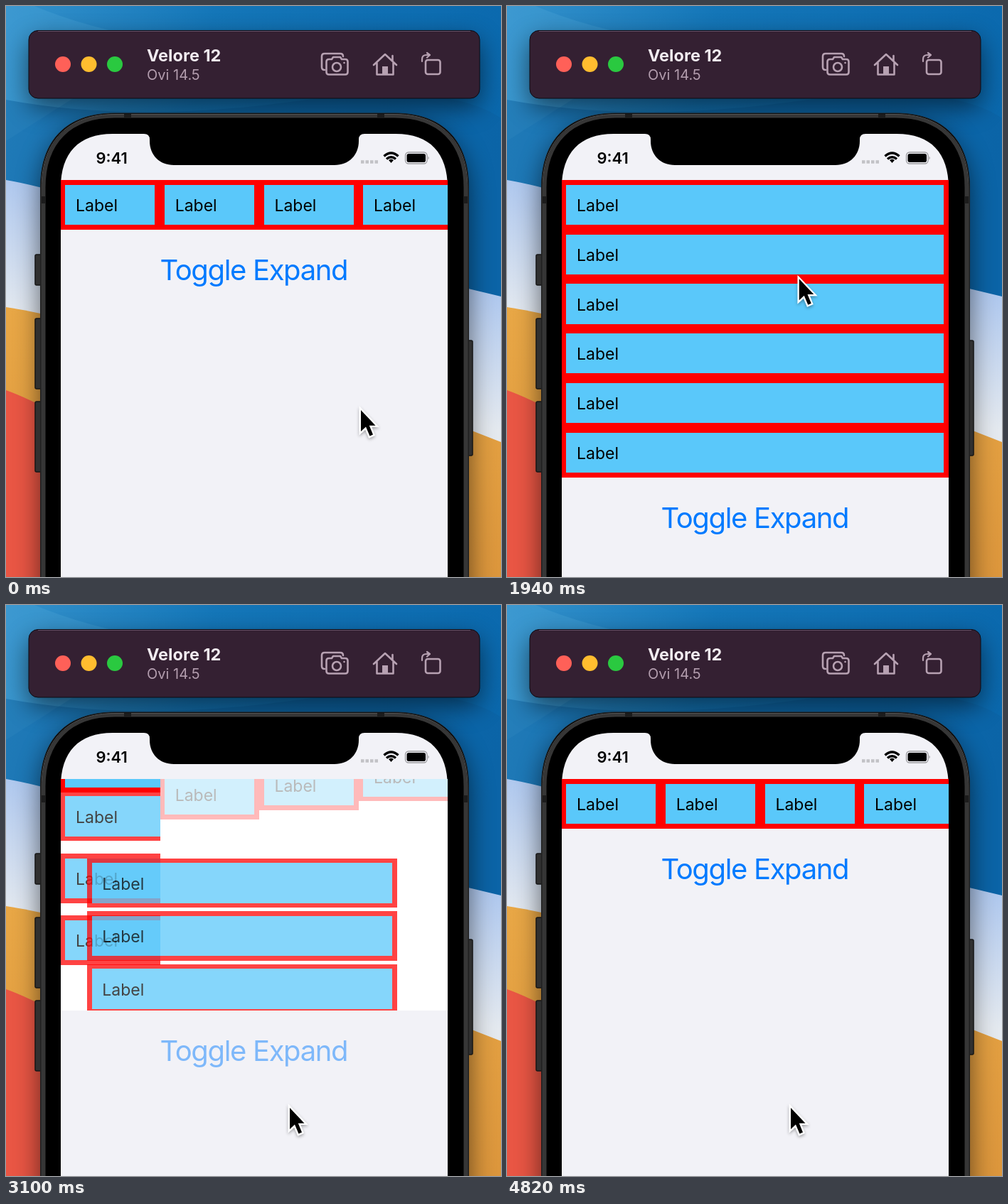
These frames come from a looping animation (696 px wide and 804 px high, 4.95 s). An HTML page:

```html
<!DOCTYPE html>
<html lang="en">
<head>
<meta charset="utf-8">
<title>Toggle Expand</title>
<style>
html, body { margin: 0; height: 100%; overflow: hidden; }
#stage { display: block; width: 100vw; height: 100vh; font-family: Inter, Roboto, sans-serif; }
#list rect { shape-rendering: crispEdges; }
.icon { fill: none; stroke: #b7a1b2; stroke-width: 2.6; stroke-linecap: round; stroke-linejoin: round; }
.key { fill: #303030; stroke: #161616; stroke-width: 1.5; }
</style>
</head>
<body>
<svg id="stage" viewBox="0 0 696 804">
  <defs>
    <linearGradient id="sky" x2="1" y2=".25">
      <stop offset="0" stop-color="#3492cc"/><stop offset=".4" stop-color="#1476b8"/><stop offset="1" stop-color="#0a68ad"/>
    </linearGradient>
    <linearGradient id="mist" gradientUnits="userSpaceOnUse" x1="0" y1="245" x2="-42" y2="425">
      <stop offset="0" stop-color="#afc8ee"/><stop offset="1" stop-color="#e4e9ef"/>
    </linearGradient>
    <linearGradient id="sand" x2="0" y2="1">
      <stop offset="0" stop-color="#e8a746"/><stop offset="1" stop-color="#dc963c"/>
    </linearGradient>
    <filter id="blur" x="-20%" y="-40%" width="140%" height="180%"><feGaussianBlur stdDeviation="18"/></filter>
    <filter id="soft" x="-50%" y="-50%" width="200%" height="200%">
      <feDropShadow dx="0" dy="2" stdDeviation="2" flood-opacity=".35"/>
    </filter>
    <path id="body" d="M48.500 850V256C48.500 188 86 151 153 151H546C613 151 650.500 188 650.500 256V850Z"/>
    <path id="screen" d="M77 804V256C77 207 102 180 150 180H194q8 0 8 8v2c0 20 14 34 34 34H462c20 0 34-14 34-34v-2q0-8 8-8H548C596 180 621 207 621 256V804Z"/>
  </defs>

  <rect width="696" height="804" fill="url(#sky)"/>
  <path d="M0 0H40Q110 30 220 50L0 190Z" fill="#5fb3de" opacity=".2"/>
  <path d="M0 132Q180 165 400 135T696 158V420H0Z" fill="#0c609f" opacity=".45"/>
  <path d="M0 245Q60 255 200 300T650 398L696 409V804H0Z" fill="url(#mist)"/>
  <path d="M0 424Q60 433 200 470T650 596L696 614V804H0Z" fill="url(#sand)"/>
  <path d="M0 541Q60 562 200 650T360 804H0Z" fill="#e95644"/>

  <use href="#body" y="14" opacity=".58" filter="url(#blur)"/>
  <rect x="32" y="48" width="634" height="95" rx="14" opacity=".55" filter="url(#blur)"/>

  <g class="key">
    <rect x="41" y="350" width="14" height="43" rx="2"/>
    <rect x="41" y="440" width="14" height="99" rx="2"/>
    <rect x="41" y="557" width="14" height="99" rx="2"/>
    <rect x="642" y="471" width="14" height="162" rx="2"/>
  </g>
  <use href="#body" stroke="#202020"/>
  <path d="M53 804V256C53 191 90 155 153 155H546C609 155 646 191 646 256V804" fill="none" stroke="#363636" stroke-width="5"/>
  <path d="M50 804V256C50 189 88 152.500 153 152.500H546C611 152.500 649 189 649 256V804" fill="none" stroke="#555"/>
  <path d="M166 155h10M522 155h10M53 268v10M646 268v10" stroke="#1c1c1c" stroke-width="6"/>
  <use href="#screen" fill="#f2f2f7"/>

  <text x="126.500" y="222" font-size="22" font-weight="600">9:41</text>
  <path d="M499 219.500h4.500m2 0h4.500m2 0h4.500m2 0h4.500" stroke="#c2c2c6" stroke-width="4.500"/>
  <g fill="none" stroke="#000" stroke-width="3.400">
    <path d="M531.500 211.500Q541.500 202.500 551.500 211.500"/>
    <path d="M535 215.500Q541.500 210 548 215.500"/>
    <path d="M538 217Q541.500 214.500 545 217L541.500 221Z" fill="#000" stroke="none"/>
  </g>
  <rect x="561.500" y="206" width="30.500" height="16" rx="4.500" fill="none" stroke="#9b9b9f" stroke-width="1.300"/>
  <rect x="563.500" y="208" width="26.500" height="12" rx="2.800"/>
  <path d="M593.500 211.500q2.500 2.500 0 5Z" fill="#9b9b9f"/>

  <svg id="list" x="77" y="245" width="544"><rect width="100%" height="100%" fill="#fff"/></svg>
  <text id="toggle" x="348.300" y="386" font-size="40" letter-spacing="-1.350" text-anchor="middle" fill="#007aff">Toggle Expand</text>

  <rect x="32" y="34.500" width="634" height="95.500" rx="13" fill="#342032" stroke="#0b0a12"/>
  <path d="M45 35.500H653" stroke="#65536a"/>
  <circle cx="80" cy="82" r="11" fill="#ff6058"/>
  <circle cx="116.500" cy="82" r="11" fill="#ffbd2f"/>
  <circle cx="153" cy="82" r="11" fill="#2ac940"/>
  <text x="198" y="78" font-size="23.500" font-weight="700" fill="#f2ecf1">Velore 12</text>
  <text x="198" y="104" font-size="20" fill="#b39dae">Ovi 14.5</text>
  <g class="icon">
    <path d="M448 90q-4 0-4-4V71q0-4 4-4H470q4 0 4 4"/>
    <path d="M454 75h4l2-3h10l2 3h5q3.500 0 3.500 3.500V93q0 3.500-3.500 3.500H454q-3.500 0-3.500-3.500V78.500q0-3.500 3.500-3.500Z"/>
    <circle cx="465" cy="86" r="6"/>
    <path d="M475.500 80h.1"/>
    <path d="M517 83L533 68L549 83M521.500 80V96.500H544.500V80M543.500 70v7"/>
    <path d="M529 85h8v11h-8Z" fill="#b7a1b2" stroke="none"/>
    <rect x="590" y="76" width="20.500" height="20" rx="3"/>
    <path d="M585 78V75q0-6 6-6h4M592 66l4 3-4 3.500" stroke-width="2.200"/>
  </g>

  <g id="cursor" filter="url(#soft)">
    <path d="M0 0V30L7 23.500L12.500 36.500L17 34.500L11.800 21.700H20.500Z" stroke="#fff" stroke-width="4.500" paint-order="stroke"/>
  </g>
</svg>
<script>
const LOOP = 4950, W = 139.7, FULL = 544, ROW = 69.83, SLOT = 87.4, EDGE = 6.3;
const OPEN = { start: 936, time: 498 }, CLOSE = { start: 2930, time: 478 };
const RELEASE = 420, PRESS_LEAD = 48, CLOSE_PRESS = 2815;
const byId = id => document.getElementById(id);
const list = byId('list'), toggle = byId('toggle'), cursor = byId('cursor');
const lerp = (a, b, p) => a + (b - a) * p;
const clamp = v => Math.min(1, Math.max(0, v));

// cubic-bezier(.42, 0, .58, 1)
function ease(x) {
  x = clamp(x);
  let lo = 0, hi = 1;
  for (let i = 0; i < 24; i++) {
    const s = (lo + hi) / 2;
    const at = 1.26 * s * (1 - s) ** 2 + 1.74 * s * s * (1 - s) + s ** 3;
    if (at < x) lo = s; else hi = s;
  }
  return lo * lo * (3 - 2 * lo);
}

function el(name, attrs, parent) {
  const node = document.createElementNS('http://www.w3.org/2000/svg', name);
  set(node, attrs);
  return parent.appendChild(node);
}
function set(node, attrs) {
  for (const k in attrs) node.setAttribute(k, attrs[k]);
}

const cells = Array.from({ length: 10 }, () => {
  const box = el('g', {}, list);
  const frame = el('rect', { height: ROW, fill: '#f00' }, box);
  const fill = el('rect', { x: EDGE, y: 6.8, height: 56.2, fill: '#5ac8fa' }, box);
  el('text', { x: 21, y: 44, 'font-size': 23 }, box).textContent = 'Label';
  return { box, frame, fill };
});

// inner is the width the content is laid out for; it is cut off at width
let used;
function place(x, y, width, opacity = 1, inner = width) {
  const { box, frame, fill } = cells[used++];
  set(box, { transform: `translate(${x} ${y})`, opacity });
  set(frame, { width });
  set(fill, { width: Math.min(inner - 13.7, width - EDGE) });
}

function expand(p) {
  place(0, 0, W, 1 - p);
  const w = lerp(W, FULL, p);
  for (let i = 1; i < 4; i++)
    place(lerp(i * W, 0, p), lerp(0, (i - 1) * ROW, p), w, 1, p ? FULL : W);
  for (let i = 3; i < 6; i++) place(0, i * ROW, w, p);
}

function collapse(p) {
  const inner = lerp(FULL, W, clamp(p * 1.1));
  for (let i = 0; i < 3; i++) place(0, 17.5 + i * SLOT, W, 1 - p, inner);
  place(0, lerp(-ROW, 0, p), W, 1, inner);
  for (let i = 1; i < 4; i++) place(i * W, lerp(-17.5 * i, 0, p), W, p);
  for (let i = 3; i < 6; i++)
    place(lerp(0, W, p), lerp(i * ROW, 17.5 + (i - 5) * SLOT, p), lerp(FULL, W, p), 1 - p);
}

// time, x, y of the pointer tip
const path = [
  [0, 499, 569], [260, 499, 569], [830, 414, 378], [1220, 413, 377],
  [1820, 413, 377], [1860, 411, 378], [2340, 399, 708], [LOOP, 399, 708]
];
function pointer(t) {
  const i = path.findIndex(k => k[0] > t);
  const [t0, x0, y0] = path[i - 1], [t1, x1, y1] = path[i];
  const x = (t - t0) / (t1 - t0);
  const p = x < .5 ? 4 * x ** 3 : 1 - 4 * (1 - x) ** 3;
  return [lerp(x0, x1, p), lerp(y0, y1, p)];
}

function draw(t) {
  const closing = t >= CLOSE.start;
  const move = closing ? CLOSE : OPEN;
  const p = ease((t - move.start) / move.time);
  const open = closing ? 1 - p : p;
  used = 0;
  (closing ? collapse : expand)(p);
  cells.forEach((c, i) => { c.box.style.display = i < used ? '' : 'none'; });

  const pressed = t >= OPEN.start - PRESS_LEAD && t < OPEN.start || t >= CLOSE_PRESS && !closing;
  const idle = t < OPEN.start;
  const glow = pressed ? .2 : idle ? 1 : lerp(.2, 1, ease((t - move.start) / RELEASE));
  set(list, { height: Math.round(lerp(ROW, 6 * ROW, open)) });
  set(toggle, { opacity: glow, transform: `translate(0 ${5 * ROW * open})` });
  set(cursor, { transform: `translate(${pointer(t)})` });
}

const begin = performance.now();
function tick() {
  draw((performance.now() - begin) % LOOP);
  requestAnimationFrame(tick);
}
tick();
</script>
</body>
</html>
```
